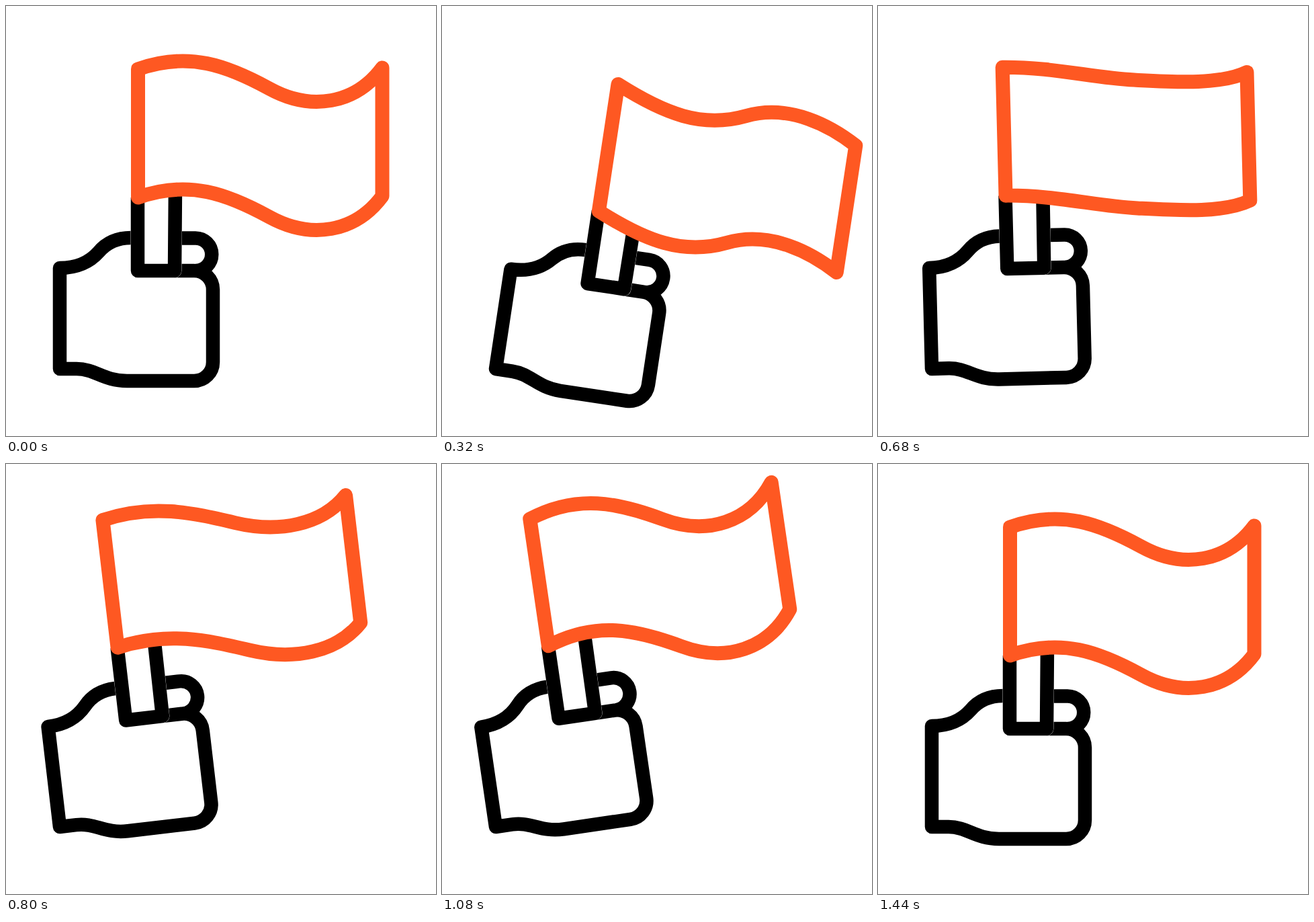
These frames come from a looping animation (640 px wide and 640 px high, 1480 ms). An HTML page:

```html
<!DOCTYPE html>
<html>
<head>
<meta charset="utf-8">
<style>
  html, body { margin: 0; height: 100%; overflow: hidden; background: #fff; }
  svg { display: block; width: 100vw; height: 100vh; }
  path { fill: none; stroke: #000; stroke-width: 20.5; stroke-linejoin: round; }
  #flag { fill: #fff; stroke: #fe5822; stroke-width: 21; }
  .seam { stroke: #fff; stroke-width: 21; }
</style>
</head>
<body>
<svg viewBox="0 0 640 640">
  <g id="arm">
    <path d="M196 345H186C164 345 149 353 138 366C123 383 104 390 80 390V540H105C133 540 145 558 180 558H280
      A28 28 0 0 0 308 530V422A28 28 0 0 0 280 394H251M251 345.500H282A24.250 24.250 0 0 1 282 394"/>
    <path class="seam" d="M196 285V394H251L252 270"/>
    <path d="M196 285V394H251L252 270"/>
    <path id="flag"/>
  </g>
</svg>
<script>
const LOOP = 1480, STEP = 40, HEIGHT = 191;
const arm = document.getElementById('arm');
const flag = document.getElementById('flag');

const keys = [
  { at: 0, angle: 0, bend: 0 },
  { at: 8, angle: 9, bend: 1 },
  { at: 23, angle: -10, bend: 0 },
  { at: 34.5, angle: 0, bend: 0 },
];

// Curve points of the flag's upper edge: x, y at rest, y when fully bent
const edge = [[196.5, 94, 94], [272, 67, 130], [330, 89, 142.5], [392, 123, 111.5], [520, 146, 107], [560, 92, 133]];

const mix = (a, b, u) => a + (b - a) * u;
const smooth = u => u * u * (3 - 2 * u);

function pose(step) {
  const next = Math.max(1, keys.findIndex(k => k.at >= step));
  const a = keys[next - 1], b = keys[next];
  const u = smooth((step - a.at) / (b.at - a.at));
  return { angle: mix(a.angle, b.angle, u), bend: mix(a.bend, b.bend, u) };
}

function flagPath(bend) {
  const top = edge.map(([x, rest, bent]) => [x, mix(rest, bent, bend)]);
  const [start, c1, c2, mid, c4, end] = top;
  const c3 = [2 * mid[0] - c2[0], 2 * mid[1] - c2[1]];
  const upper = [start, c1, c2, mid, c3, c4, end];
  const lower = upper.map(([x, y]) => [x, y + HEIGHT]).reverse();
  const curve = ([first, ...others]) => `${first}C${others.join(' ')}`;
  return `M${curve(upper)}L${curve(lower)}Z`;
}

function draw(time) {
  // The pose holds for one extra step at the start of the loop
  const step = Math.floor(time % LOOP / STEP) - 1;
  const { angle, bend } = pose(Math.min(Math.max(step, 0), keys.at(-1).at));
  arm.setAttribute('transform', `rotate(${angle} 80 540)`);
  flag.setAttribute('d', flagPath(bend));
}

const start = performance.now();
function tick() {
  draw(performance.now() - start);
  requestAnimationFrame(tick);
}
tick();
</script>
</body>
</html>
```
